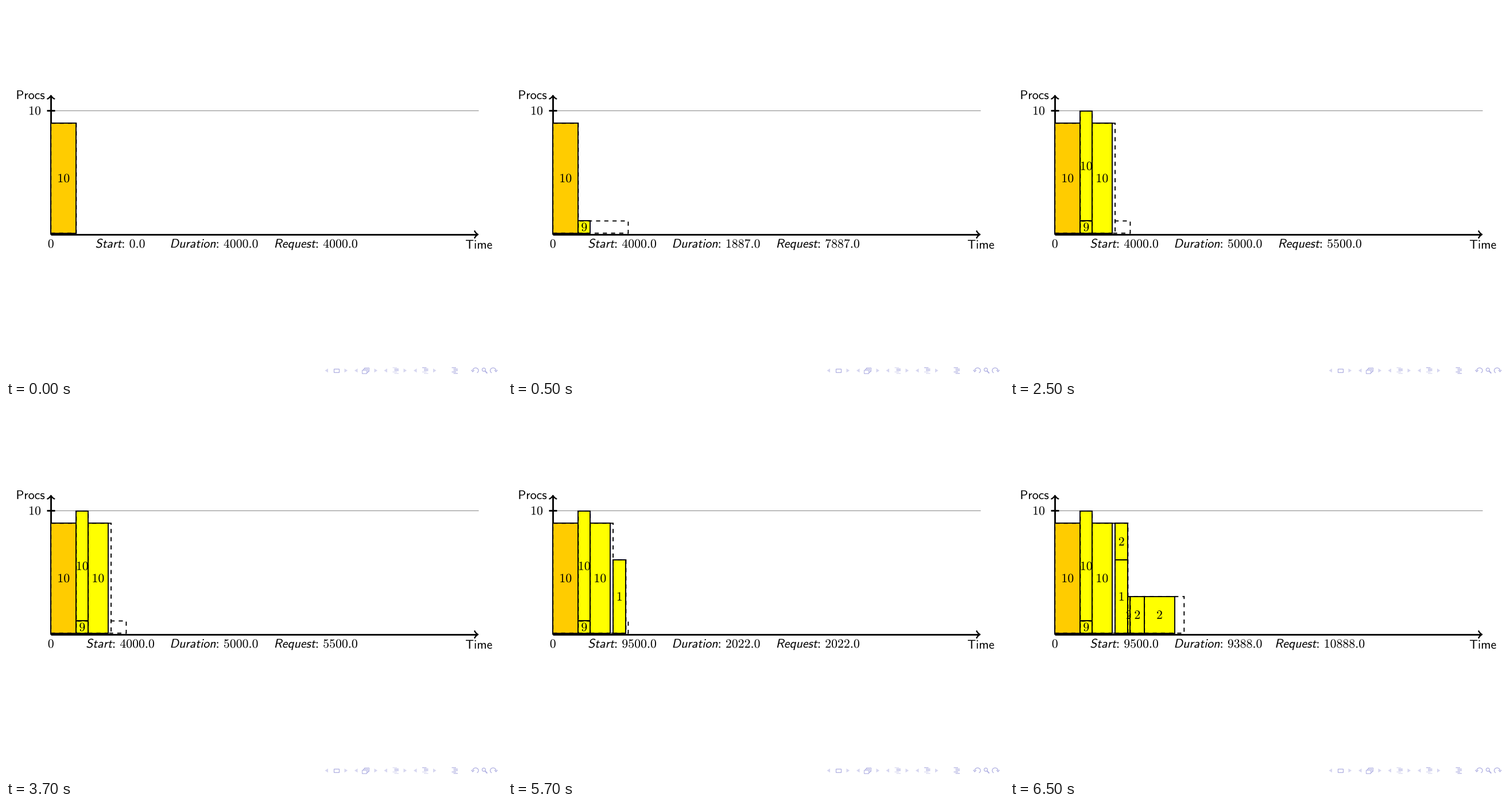
A matplotlib script for the animation above (8 s loop, 864x648 px).

```python
import numpy as np
import matplotlib.pyplot as plt
from matplotlib.animation import FuncAnimation
from matplotlib.patches import PathPatch
from matplotlib.path import Path
from matplotlib.textpath import TextPath
from matplotlib.transforms import Affine2D

plt.rcParams["mathtext.fontset"] = "cm"
W, H = 864, 648
PT = W / 362.835            # pixels per slide point
THIN, THICK, HEAVY = 0.4 * PT, 0.8 * PT, 1.2 * PT
EM = 21.8
X0, Y0 = 78.2, 395.7        # pixel position of time 0, processor 0
PX_TIME, PX_PROC = 0.01104, 21.27
ORANGE, YELLOW = "#ffcc00", "#ffff00"
PALE, SOFT = "#d6d6f0", "#adade1"

fig = plt.figure(figsize=(W / 72, H / 72), dpi=72, facecolor="white")
ax = fig.add_axes([0, 0, 1, 1])
ax.set_xlim(0, W)
ax.set_ylim(H, 0)
ax.axis("off")


def add(path, fill="none", edge="none", lw=0, **style):
    return ax.add_patch(PathPatch(path, fc=fill, ec=edge, lw=lw, **style))


def line(points, lw, color="black", **style):
    return add(Path(points), edge=color, lw=lw, **style)


def box(x0, y0, x1, y1):
    return Path([(x0, y0), (x1, y0), (x1, y1), (x0, y1), (x0, y0)], closed=True)


def text(x, baseline, string, slant=0):
    glyphs = TextPath((0, 0), rf"$\mathsf{{{string}}}$", size=EM)
    place = Affine2D([[1, slant, x], [0, -1, baseline], [0, 0, 1]])
    return add(glyphs.transformed(place), "black")


def dot(x, baseline):
    x += 0.09 * EM
    return add(box(x, baseline, x + 0.098 * EM, baseline - 0.098 * EM),
               "black", snap=False)


def digits_width(string):
    return 0.5 * EM * len(string)


def centered(x, y, digits):
    return text(x - digits_width(digits) / 2, y + 7, digits)


# ---- axes ----
def arrow_head(x, y, turn):
    d = (0.28 + 0.3 * 1.2) * PT
    pts = np.array([(-3, 4), (-2.75, 2.5), (0, 0.25), (0.75, 0),
                    (0, -0.25), (-2.75, -2.5), (-3, -4)]) * d
    path = Path(pts, [Path.MOVETO] + [Path.CURVE4] * 6)
    path = path.transformed(Affine2D().rotate_deg(turn).translate(x, y))
    add(path, edge="black", lw=0.8 * HEAVY, capstyle="round", joinstyle="round")


def draw_axes():
    line([(78.3, 181.8), (823, 181.8)], THIN, "#808080")
    line([(78.3, 398), (821, 398)], HEAVY)
    arrow_head(821, 398, 0)
    line([(78.3, 398), (78.3, 157.1)], HEAVY)
    arrow_head(78.3, 157.1, -90)
    line([(71.2, 181.8), (85.4, 181.8)], HEAVY)
    text(17.4, 162.2, "Procs")
    text(800.2, 422.8, "Time")
    centered(50, 182.4, "10")
    centered(78.2, 414, "0")


# ---- navigation bar ----
def triangle(x, direction):
    add(Path([(x, 635), (x - 5.5 * direction, 631.5),
              (x - 5.5 * direction, 638.5), (x, 635)], closed=True), PALE)


def text_lines(x, colors):
    for row, (shift, color) in enumerate(zip((0, 3, 3, 0, 3), colors)):
        y = 630 + 2.5 * row
        line([(x + shift, y), (x + shift + 7.5, y)], 1.2, color, snap=False)


def curl(x, side):
    t = np.radians(np.linspace(60, -180, 40))
    line(np.column_stack([x + side * 5 * np.cos(t), 635 + 4.6 * np.sin(t)]),
         1.2, SOFT)
    tip = x - side * 5
    line([(tip - 2.4, 634), (tip, 637.3), (tip + 2.6, 634)], 1.2, SOFT)


def draw_navigation():
    for left, right in ((555.5, 595), (607, 647), (658.5, 698), (710, 749.5)):
        triangle(left, -1)
        triangle(right, 1)
    add(box(570.5, 631.8, 579.5, 638.2), edge=SOFT, lw=1.2)
    for shift in (4, 2, 0):
        add(box(619.8 + shift, 633.8 - shift, 628 + shift, 640 - shift),
            "white", SOFT, 1)
    text_lines(673.5, [PALE, SOFT, SOFT, PALE, PALE])
    text_lines(725, [SOFT, SOFT, SOFT, PALE, PALE])
    text_lines(776.5, [SOFT] * 5)
    curl(818, 1)
    add(Path.circle((832.3, 633.5), 2.9), edge=SOFT, lw=1.2)
    line([(834.4, 635.6), (838.3, 639.8)], 1.8, SOFT)
    curl(848.5, -1)


# ---- schedule ----
# stage, label, start, end, requested end, lowest and highest processor
JOBS = [
    (0, "10", 0, 4000, 4000, 0, 9),
    (1, "9", 4000, 5887, 11887, 0, 1),
    (2, "10", 4000, 5887, 5887, 1, 10),
    (2, "10", 5887, 9000, 9500, 0, 9),
    (3, "1", 9500, 11522, 11522, 0, 6),
    (4, "2", 9500, 11522, 11522, 6, 9),
    (4, "2", 11522, 11887, 11887, 0, 3),
    (4, "2", 11887, 14130, 14130, 0, 3),
    (4, "2", 14130, 18888, 20388, 0, 3),
]
# start, duration, request
CAPTIONS = [(0, 4000, 4000), (4000, 1887, 7887), (4000, 5000, 5500),
            (9500, 2022, 2022), (9500, 9388, 10888)]
# word, its width in em, column centre
COLUMNS = [("Start", 2.101, 199), ("Duration", 3.679, 362.4),
           ("Request", 3.312, 539.7)]


def draw_job(label, start, end, requested, low, high):
    left, right, limit = (X0 + PX_TIME * t for t in (start, end, requested))
    bottom, top = Y0 - PX_PROC * low, Y0 - PX_PROC * high
    return [
        add(box(left, bottom, right, top), ORANGE if start == 0 else YELLOW,
            "black", THICK),
        add(box(left, bottom, limit, top), edge="black", lw=THICK,
            ls=(0, (3.75, 3.75)), snap=False),
        centered((left + right) / 2, (bottom + top) / 2, label),
    ]


def draw_caption(values):
    parts, base = [], 421
    for (word, width, center), value in zip(COLUMNS, values):
        whole = str(value)
        number = digits_width(whole + "0") + 0.278 * EM
        x = center - (EM * (width + 0.278 + 0.333) + number) / 2
        parts.append(text(x, base, word, slant=0.2126))
        x += width * EM
        parts += [dot(x, base), dot(x, base - 0.346 * EM)]
        x += 0.611 * EM
        parts.append(text(x, base, whole))
        x += digits_width(whole)
        parts += [dot(x, base), text(x + 0.278 * EM, base, "0")]
    return parts


draw_axes()
draw_navigation()
jobs = [(stage, draw_job(*job)) for stage, *job in JOBS]
captions = [draw_caption(values) for values in CAPTIONS]


def show(frame):
    now = (frame + 3) // 4      # first stage lasts one tick, later ones four
    for stage, parts in jobs:
        for part in parts:
            part.set_visible(stage <= now)
    for stage, parts in enumerate(captions):
        for part in parts:
            part.set_visible(stage == now)
    return []


anim = FuncAnimation(fig, show, frames=16, interval=500, repeat=True)
plt.show()
```
